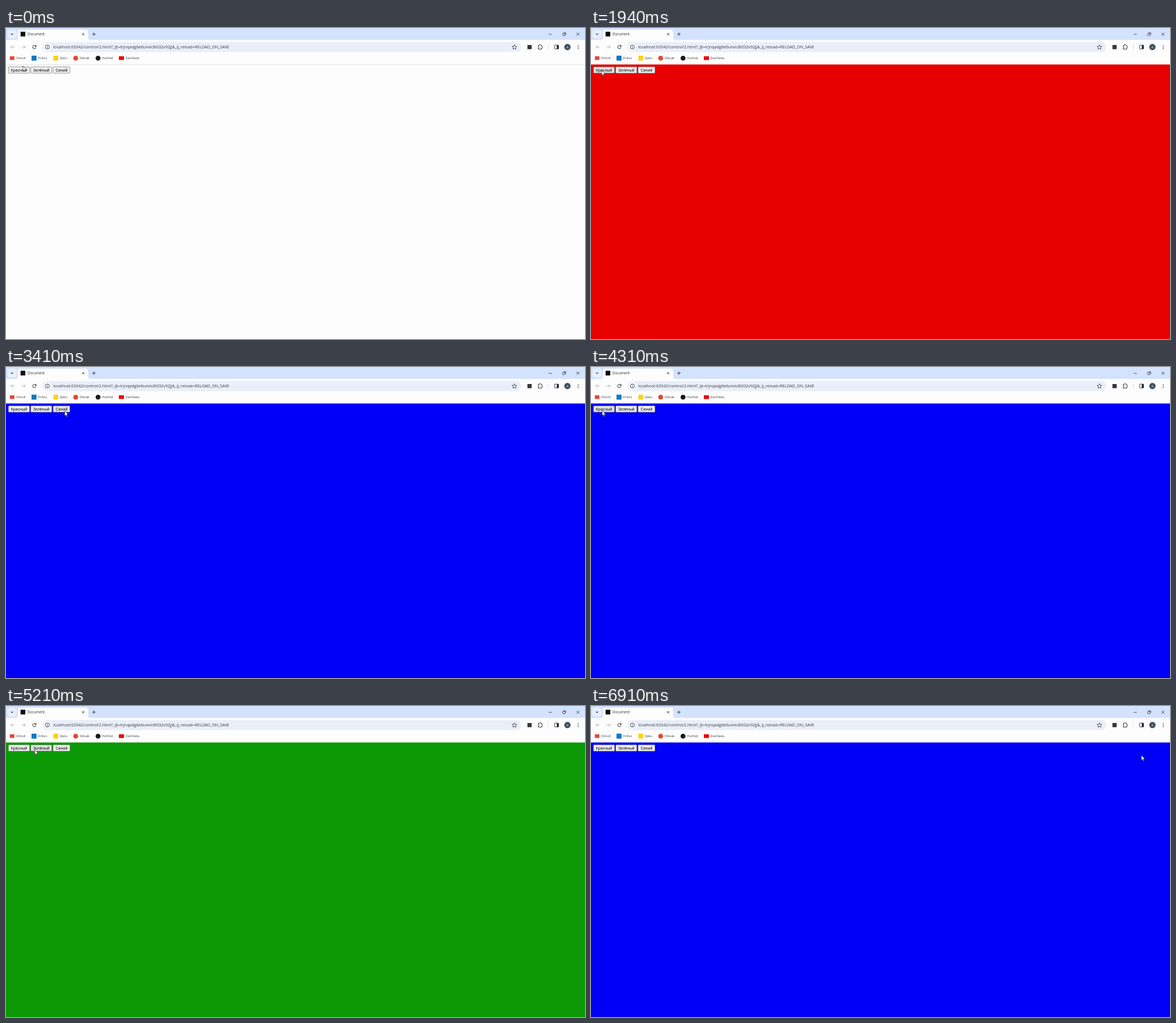
Animation of 1021x549 px, one loop 6980 ms. Source, as an HTML page with a canvas:

```html
<!DOCTYPE html>
<html lang="ru">
<head>
<meta charset="utf-8">
<title>Colour buttons</title>
<style>
  html, body { margin: 0; width: 100%; height: 100%; overflow: hidden; background: #fdfdfd; }
  canvas { display: block; width: 1021px; height: 549px; }
</style>
</head>
<body>
<canvas id="stage" width="1021" height="549"></canvas>
<script>
const W = 1021, H = 549, LOOP = 6980;
const ctx = document.getElementById('stage').getContext('2d');
const UI = '"Open Sans", "Noto Sans", sans-serif';
const FORM = '"Liberation Sans", Arial, sans-serif';
const INK = '#2b2d30';

// Pointer stops: time, x, y
const path = [
  [40, 30, 67], [350, 64, 73], [700, 98, 74], [900, 98, 74],
  [1570, 18.5, 74.5], [2370, 18.5, 75], [2570, 53.5, 75], [2810, 53.5, 75],
  [3380, 103.5, 77.5], [3840, 103.5, 77.5], [4040, 22, 81], [4210, 22, 81],
  [4380, 18.5, 75], [4740, 18.5, 75], [4770, 22, 86], [4940, 22, 86],
  [5140, 50.5, 77], [5440, 50.5, 77], [5610, 96, 86], [5910, 96, 86],
  [6000, 100, 77], [6440, 100, 77], [6760, 975, 100], [6910, 970.5, 87]
];

// Page colour from each click on
const pages = [
  [0, '#fdfdfd'], [1910, '#e80000'], [2600, '#0a9905'], [3400, '#0000f6'],
  [4410, '#e80000'], [5180, '#0a9905'], [6010, '#0000f6']
];

const buttons = [
  { x: 4.3, w: 37.3, label: 'Красный' },
  { x: 43.6, w: 37.2, label: 'Зелёный' },
  { x: 83, w: 29.8, label: 'Синий' }
];
const BTN_Y = 68.6, BTN_H = 11.2;

const bookmarks = [
  { x: 6.8, w: 8, h: 6.5, color: '#e2483b', tx: 18, label: 'Omvil' },
  { x: 45, w: 8.8, h: 8.8, color: '#0b79c4', tx: 56.7, label: 'Frilvo' },
  { x: 83.5, w: 8.5, h: 8.5, color: '#fcd116', tx: 94.5, label: 'Qelu' },
  { x: 118.6, w: 8.6, color: '#e5482b', tx: 130, label: 'Dilvak' },
  { x: 158, w: 8.6, color: '#17181c', tx: 169, label: 'Hufnid' },
  { x: 199, w: 9, h: 6.6, color: '#f00505', tx: 210.7, label: 'ZanFedu' }
];

function box(x, y, w, h, r, fill, stroke, lw = 0.6) {
  ctx.beginPath();
  ctx.roundRect(x, y, w, h, r);
  paint(fill, stroke, lw);
}

function disc(x, y, r, fill, stroke, lw = 0.8) {
  ctx.beginPath();
  ctx.arc(x, y, r, 0, Math.PI * 2);
  paint(fill, stroke, lw);
}

function paint(fill, stroke, lw) {
  if (fill) { ctx.fillStyle = fill; ctx.fill(); }
  if (stroke) { ctx.strokeStyle = stroke; ctx.lineWidth = lw; ctx.stroke(); }
}

function line(points, color = INK, lw = 0.9) {
  ctx.beginPath();
  points.forEach(([x, y], i) => i ? ctx.lineTo(x, y) : ctx.moveTo(x, y));
  paint(null, color, lw);
}

function text(str, x, y, size, color = INK, family = UI, align = 'left', weight = '') {
  ctx.font = `${weight} ${size}px ${family}`;
  ctx.textAlign = align;
  ctx.fillStyle = color;
  ctx.fillText(str, x, y);
}

function cross(x, y, r) {
  line([[x - r, y - r], [x + r, y + r]]);
  line([[x - r, y + r], [x + r, y - r]]);
}

function arrow(x, y, dir, color) {
  line([[x - 3.2, y], [x + 3.2, y]], color);
  line([[x + dir * 0.2, y - 3], [x + dir * 3.2, y], [x + dir * 0.2, y + 3]], color);
}

function star(x, y) {
  ctx.beginPath();
  for (let i = 0; i < 10; i++) {
    const a = -Math.PI / 2 + i * Math.PI / 5, r = i % 2 ? 2 : 4.4;
    ctx.lineTo(x + r * Math.cos(a), y + r * Math.sin(a));
  }
  ctx.closePath();
  paint(null, INK, 0.8);
}

function reload(x, y) {
  ctx.beginPath();
  ctx.arc(x, y, 3, 0.3, Math.PI * 1.78);
  paint(null, INK, 1);
  ctx.beginPath();
  ctx.moveTo(x + 3.5, y - 3.7);
  ctx.lineTo(x + 3.5, y - 0.3);
  ctx.lineTo(x + 0.2, y - 0.3);
  ctx.closePath();
  paint(INK);
}

function puzzle(x, y) {
  ctx.beginPath();
  ctx.moveTo(x - 3.4, y - 2.5);
  ctx.lineTo(x - 1.2, y - 2.5);
  ctx.arc(x, y - 2.8, 1.2, Math.PI, 0);
  ctx.lineTo(x + 2.8, y - 2.5);
  ctx.lineTo(x + 2.8, y - 0.6);
  ctx.arc(x + 2.9, y + 0.6, 1.2, -Math.PI / 2, Math.PI / 2);
  ctx.lineTo(x + 2.8, y + 4);
  ctx.lineTo(x - 3.4, y + 4);
  ctx.lineTo(x - 3.4, y + 1.9);
  ctx.arc(x - 3.4, y + 0.7, 1.2, Math.PI / 2, -Math.PI / 2, true);
  ctx.closePath();
  paint(null, INK, 1);
}

function drawTabs() {
  ctx.fillStyle = '#d3e2fd';
  ctx.fillRect(0, 0, W, 21);
  box(2.5, 3, 16.5, 15.5, 5, '#e7effd');
  line([[8.6, 9.8], [10.6, 11.8], [12.6, 9.8]], INK, 1.1);

  ctx.beginPath();
  ctx.moveTo(16, 21.5);
  ctx.quadraticCurveTo(21, 21.5, 21, 16.5);
  ctx.lineTo(21, 8);
  ctx.quadraticCurveTo(21, 3, 26, 3);
  ctx.lineTo(140, 3);
  ctx.quadraticCurveTo(145, 3, 145, 8);
  ctx.lineTo(145, 16.5);
  ctx.quadraticCurveTo(145, 21.5, 150, 21.5);
  paint('#fdfdfe');

  box(25.7, 6.6, 8.3, 8.3, 0, '#0b0d10');
  text('Document', 38, 13.3, 6.2);
  cross(136.2, 10.9, 2);
  line([[152, 10.9], [158, 10.9]]);
  line([[155, 7.9], [155, 13.9]]);

  line([[957, 11.2], [962.5, 11.2]], INK, 0.8);
  box(981.7, 9.5, 4, 4, 0.6, null, INK, 0.8);
  line([[983.2, 8.3], [987, 8.3], [987, 12.2]], INK, 0.8);
  cross(1008.6, 10.9, 2.5);
}

function drawToolbar() {
  ctx.fillStyle = '#fdfdfe';
  ctx.fillRect(0, 21, W, 43.4);
  arrow(12, 33.6, -1, '#a9abae');
  arrow(30.8, 33.6, 1, '#a9abae');
  reload(50, 33.6);

  box(64, 24.8, 844.5, 17.8, 8.9, '#e9eef9');
  disc(73, 33.6, 6.6, '#fafbfe');
  disc(73, 33.6, 3.6, null, INK, 0.9);
  line([[73, 33.1], [73, 35.6]]);
  line([[73, 31.5], [73, 32.4]]);
  text('localhost:63342/control/2.html?_ijt=trjnqadg6e6unvic8i032v92jj&_ij_reload=RELOAD_ON_SAVE',
    83.3, 36, 7.125, '#3a3c40');
  star(896.6, 33.9);

  box(919.5, 30, 7.4, 7.4, 0, '#33363a');
  puzzle(942, 33.2);
  line([[956.5, 29.5], [956.5, 37.5]], '#cfdff8', 1);
  box(967.4, 30.2, 7, 6.8, 0.8, null, INK, 0.9);
  ctx.fillStyle = INK;
  ctx.fillRect(971.2, 30.2, 3.4, 6.8);
  disc(990, 33.6, 5.6, '#40535e');
  text('A', 990, 35.6, 5.6, '#eef2f4', UI, 'center');
  for (let i = -1; i <= 1; i++) disc(1009, 33.6 + i * 2.8, 0.8, INK);
}

function drawBookmarks() {
  for (const b of bookmarks) {
    if (b.h) box(b.x, 53.2 - b.h / 2, b.w, b.h, 0, b.color);
    else disc(b.x + b.w / 2, 53.2, b.w / 2, b.color);
    text(b.label, b.tx, 55.4, 6.15, '#3a3c40');
  }
}

function drawButtons(p) {
  for (const b of buttons) {
    const hover = p.x >= b.x && p.x <= b.x + b.w && p.y >= BTN_Y && p.y <= BTN_Y + BTN_H;
    box(b.x, BTN_Y, b.w, BTN_H, 1.3, hover ? '#e3e4e5' : '#efefef', hover ? '#505050' : '#727272', 0.7);
    text(b.label, b.x + b.w / 2, 76.8, 7.1, '#0c0c0c', FORM, 'center');
  }
}

function drawPointer({ x, y }) {
  const k = 0.54;
  const shape = [[0, 0], [0, 16.5], [3.7, 13], [6.3, 19], [8.8, 18], [6.2, 12], [11.6, 12]];
  ctx.beginPath();
  for (const [px, py] of shape) ctx.lineTo(x + px * k, y + py * k);
  ctx.closePath();
  paint('#ffffff', '#111111', 0.6);
}

function pointerAt(t) {
  const i = path.findIndex(p => p[0] > t);
  const b = i < 0 ? path[path.length - 1] : path[i];
  const a = i > 0 ? path[i - 1] : b;
  const u = b === a ? 0 : (t - a[0]) / (b[0] - a[0]);
  const e = u * u * (3 - 2 * u);
  return { x: a[1] + (b[1] - a[1]) * e, y: a[2] + (b[2] - a[2]) * e };
}

function draw(t) {
  const page = pages.filter(p => p[0] <= t).pop()[1];
  const pointer = pointerAt(t);
  ctx.fillStyle = page;
  ctx.fillRect(0, 0, W, H);
  drawTabs();
  drawToolbar();
  drawBookmarks();
  if (t < pages[1][0]) {
    ctx.fillStyle = '#dcdee2';
    ctx.fillRect(0, 64, W, 0.8);
  }
  drawButtons(pointer);
  drawPointer(pointer);
}

const start = performance.now();
function tick() {
  draw((performance.now() - start) % LOOP);
  requestAnimationFrame(tick);
}
tick();
</script>
</body>
</html>
```
